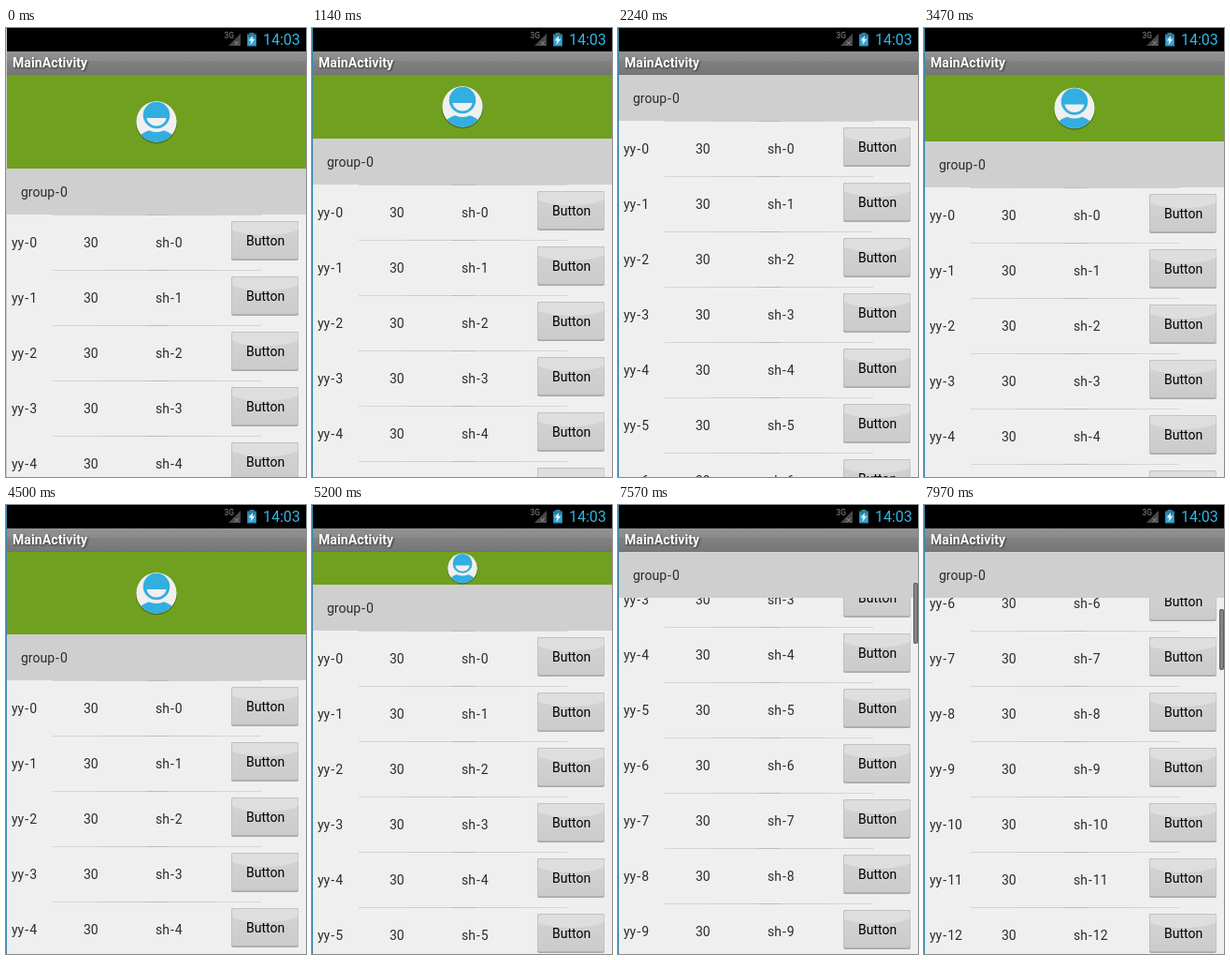
Animation of 321 by 479 pixels, one loop 8 s. Source, as an HTML page:

```html
<!DOCTYPE html>
<html lang="en">
<head>
<meta charset="utf-8">
<title>MainActivity</title>
<style>
html, body { margin: 0; width: 100%; height: 100%; overflow: hidden; background: #efefef; }
svg { display: block; width: 321px; height: 479px; }
text { font-family: Roboto, sans-serif; font-size: 14px; fill: #2b2b2b; }
.title { font-weight: 700; fill: #fff; letter-spacing: 0.1px; filter: drop-shadow(1px 1px 1px #333); }
</style>
</head>
<body>
<svg viewBox="0 0 321 479" xmlns="http://www.w3.org/2000/svg">
  <defs>
    <linearGradient id="face" x1="0" y1="0" x2="0" y2="1">
      <stop offset="0" stop-color="#d4d4d4"/>
      <stop offset="1" stop-color="#cbcbcb"/>
    </linearGradient>
    <linearGradient id="bar" x1="0" y1="0" x2="0" y2="1">
      <stop offset="0" stop-color="#929292"/>
      <stop offset="0.38" stop-color="#8b8b8b"/>
      <stop offset="0.42" stop-color="#818181"/>
      <stop offset="1" stop-color="#767676"/>
    </linearGradient>
    <clipPath id="btnClip"><rect x="242" y="8" width="70.5" height="39" rx="2"/></clipPath>
    <clipPath id="disc"><circle r="21.7"/></clipPath>
    <g id="button">
      <rect x="241" y="7" width="72" height="42" rx="2.5" fill="#a8a8a8"/>
      <rect x="241" y="7" width="72" height="40.500" rx="2" fill="#c2c2c2"/>
      <rect x="242" y="8" width="70" height="39" rx="2" fill="url(#face)"/>
      <ellipse cx="277" cy="9" rx="43" ry="13" fill="#dedede" clip-path="url(#btnClip)"/>
      <text x="257" y="33" style="fill:#000">Button</text>
    </g>
    <g id="rule">
      <rect x="50" width="223" height="1" fill="#d4d4d4"/>
      <rect x="100" width="124" height="1" fill="#cdcdcd"/>
      <rect x="150" width="24" height="1" fill="#bdbdbd"/>
    </g>
  </defs>
  <rect width="321" height="479" fill="#efefef"/>
  <g id="rows"></g>
  <g id="group">
    <rect width="321" height="49" fill="#cfcfcf"/>
    <text x="16" y="30">group<tspan dx="1">-</tspan><tspan dx="1">0</tspan></text>
  </g>
  <rect id="head" y="50" width="321" fill="#70a01f"/>
  <g id="icon">
    <circle cy="1.2" r="22" fill="#3f5c17" opacity="0.75"/>
    <g clip-path="url(#disc)">
      <circle r="22" fill="#f0f0f0"/>
      <ellipse cy="23" rx="21" ry="15" fill="#33aee0"/>
      <circle cy="-7" r="18" fill="#f0f0f0"/>
      <circle cy="-7" r="14.3" fill="#33aee0"/>
      <path d="M-10.500-4H10.500C9.500 1.500 5 4.500 0 4.500S-9.500 1.500-10.500-4Z" fill="#f0f0f0"/>
    </g>
  </g>
  <rect y="25" width="321" height="25" fill="url(#bar)"/>
  <rect y="49" width="321" height="1" fill="#707070"/>
  <text class="title" x="7" y="42">MainActivity</text>
  <rect width="321" height="25" fill="#000"/>
  <text x="233.500" y="11" style="font-size:8.5px;fill:#8a8a8a">3G</text>
  <path d="M251 6V19H238Z" fill="#484848"/>
  <path d="M244.500 14l4.500 4.500m0-4.500l-4.500 4.500" stroke="#8c8c8c"/>
  <path d="M260.500 5h5v1.500h2.500V19.500h-10V6.500h2.500Z" fill="#2b7f9f"/>
  <path d="M259 10h8v8.500h-8Z" fill="#33a5d6"/>
  <path d="M264 8l-4 5.500h2.500l-1 4.500 4.500-6h-2.500Z" fill="#fff"/>
  <text x="275" y="18" style="font-size:16px;fill:#33b5e5">14:03</text>
  <rect id="edge" width="1" height="479"/>
  <g id="thumb">
    <rect x="316" width="5" height="65" rx="2" fill="#5c5c5c"/>
    <rect x="317" y="1" width="3" height="63" rx="1.5" fill="#858585"/>
  </g>
</svg>
<script>
const $ = id => document.getElementById(id);
const LOOP = 8000, TOP = 50, ROW = 59;

const label = (x, word, n) =>
  `<text x="${x}" y="35">${word}<tspan dx="1">-</tspan><tspan dx="1">${n}</tspan></text>`;

$('rows').innerHTML = Array.from({ length: 15 }, (_, i) => `
  <g transform="translate(0 ${i * ROW})">
    <use href="#rule"/>${label(6, 'yy', i)}
    <text x="83" y="35">30</text>${label(160, 'sh', i)}
    <use href="#button"/>
  </g>`).join('');

// Each move: first step time, last step time, step count, first value, last value
const headMoves = [
  [0, 0, 1, 100, 100],
  [1040, 1240, 3, 88, 48],
  [1440, 1640, 3, 40, 23],
  [1840, 2240, 5, 18, 0],
  [2570, 2770, 3, 8, 24],
  [2970, 3470, 6, 33, 71],
  [3570, 3770, 3, 81, 100],
  [4500, 4700, 3, 88, 66],
  [4900, 4900, 1, 47, 47],
  [5100, 5750, 9, 40, 0]
];
const listMoves = [
  [0, 0, 1, 0, 0],
  [7570, 7970, 5, 205, 378]
];

function valueAt(moves, t) {
  const [start, end, n, a, b] = moves.filter(m => m[0] <= t).pop();
  if (n === 1 || t >= end) return b;
  const k = Math.floor((t - start) / (end - start) * (n - 1) + 1e-6);
  return Math.round(a + (b - a) * k / (n - 1));
}

function draw(t) {
  const h = valueAt(headMoves, t), scroll = valueAt(listMoves, t);
  const move = (id, x, y, more = '') =>
    $(id).setAttribute('transform', `translate(${x} ${y})${more}`);
  $('head').setAttribute('height', h);
  $('icon').style.display = h ? '' : 'none';
  move('icon', 161, TOP + h / 2, ` scale(${Math.min(1, h / 48)})`);
  move('group', 0, TOP + h);
  move('rows', 0, TOP + h + 49 - scroll);
  $('thumb').style.display = scroll ? '' : 'none';
  move('thumb', 0, TOP + Math.round(scroll * 61 / 378));
  $('edge').setAttribute('fill', t < 620 ? '#cccccc' : '#3d87a8');
}

const begin = performance.now();
function tick() {
  draw((performance.now() - begin) % LOOP);
  requestAnimationFrame(tick);
}
tick();
</script>
</body>
</html>
```
